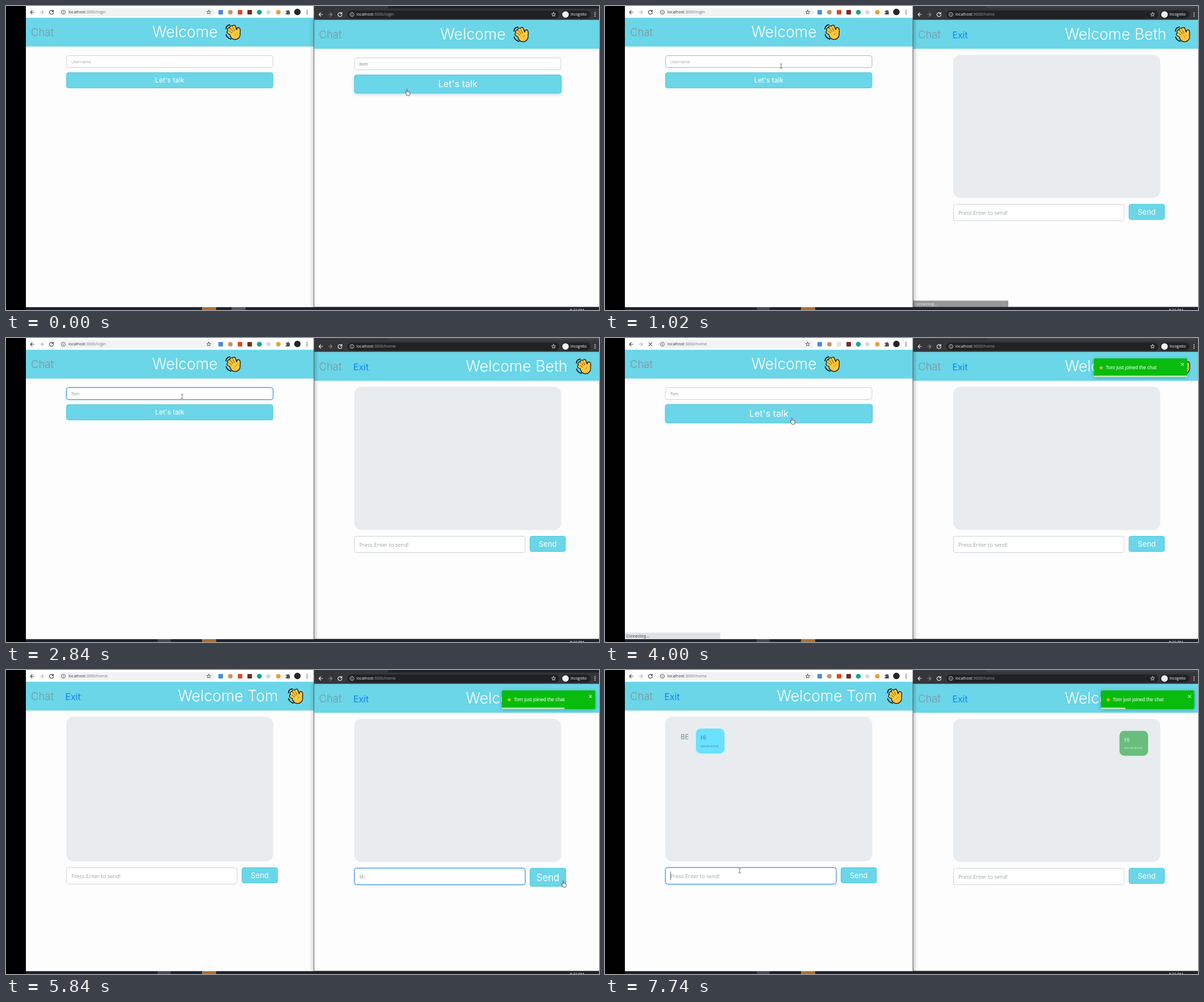
An HTML page for the animation above (8 s loop, 1044 by 536 pixels).

```html
<!DOCTYPE html>
<html lang="en">
<head>
<meta charset="utf-8">
<title>Chat demo</title>
<style>
html, body { margin: 0; width: 100%; height: 100%; overflow: hidden; background: #000; }
svg { display: block; width: 1044px; height: 536px; }
text { white-space: pre; }
.brand { font-family: Inter, Roboto, sans-serif; font-weight: 300; }
.label { font-family: Inter, Roboto, sans-serif; font-weight: 400; }
.ui { font-family: "Open Sans", "Noto Sans", sans-serif; }
.field { font-family: "Open Sans", "Noto Sans", sans-serif; font-weight: 300; }
.toast { font-family: "Liberation Sans", Arial, sans-serif; }
.glyph { font-family: "DejaVu Sans", sans-serif; }
.line { fill: none; stroke-linecap: round; stroke-linejoin: round; }
.lift { filter: drop-shadow(0 2px 2.5px rgba(50, 125, 220, .32)); }
.glow { filter: drop-shadow(0 0 1.5px rgba(40, 130, 240, .5)); }
.raised { filter: drop-shadow(0 1px 3px rgba(0, 0, 0, .25)); }
</style>
</head>
<body>
<svg id="stage" viewBox="0 0 1044 536"></svg>
<script>
const LOOP = 8000;
const CYAN = '#6ad6e8', RIM = '#52c8dc', PANEL = '#e8ecef', BLUE = '#2f8df5', GREY = '#ccd2d8';
const stage = document.getElementById('stage');

const rect = (x, y, w, h, fill, r = 0, extra = '') =>
  `<rect x="${x}" y="${y}" width="${w}" height="${h}" rx="${r}" fill="${fill}" ${extra}/>`;
const circle = (x, y, r, fill, extra = '') => `<circle cx="${x}" cy="${y}" r="${r}" fill="${fill}" ${extra}/>`;
const text = (cls, x, y, size, fill, str, anchor = 'start') =>
  `<text class="${cls}" x="${x}" y="${y}" font-size="${size}" fill="${fill}" text-anchor="${anchor}">${str}</text>`;
const line = (d, color, width = 1.2) => `<path class="line" d="${d}" stroke="${color}" stroke-width="${width}"/>`;
const move = (x, y, content) => `<g transform="translate(${x} ${y})">${content}</g>`;
const during = (from, to, content) => `<g data-from="${from}" data-to="${to}">${content}</g>`;

// Waving hand, 28 by 28
function wave(x, y) {
  const fingers = 'M16 20L6 14.5M16 18L7 9.8M17 17L10.8 6.3M19 16L15.2 5.2M21.5 19Q24.500 15 23.200 9.500';
  return move(x, y,
    line('M1.3 9Q1.5 2.5 8 1.6M1.5 19Q3.5 25.5 10 26.8', '#080808', 1.7) +
    line(fingers, '#080808', 7) + circle(17.3, 18.6, 9.6, '#080808') +
    line(fingers, '#ffc83d', 4.6) + circle(17.3, 18.6, 8.4, '#ffc83d') +
    line('M7.300 12.600L12 16M9.500 8.500L13.800 13.600M13.500 6.500L16.500 12.500', '#3a2c10', .8) +
    line('M17 20Q17.500 16.500 21 15.500', '#d88a1c', 1));
}

function button(x, y, w, h, size, label, cls = '') {
  return rect(x, y, w, h, CYAN, 3.5, `stroke="${RIM}" class="${cls}"`) +
    text('label', x + w / 2, y + h / 2 + size * .36, size, '#fff', label, 'middle');
}

const input = (x, y, w, h, stroke = GREY, cls = '') =>
  rect(x, y, w, h, '#fff', 4, `stroke="${stroke}" class="${cls}"`);

const talk = (hover, cls) => hover
  ? button(71.5, 97.5, 364, 32, 16.2, "Let's talk", cls)
  : button(71.5, 97.5, 363.5, 27, 12.1, "Let's talk");

const loginField = (value, stroke, cls) =>
  input(71.5, 67.5, 363.5, 21, stroke, cls) +
  text('field', 80, 81, 7.4, value ? '#40484f' : '#6c757d', value || 'Username');

const header = (name) => rect(0, .5, 510, 51, CYAN) +
  text('brand', 9, 32.7, 18.5, '#7f949b', 'Chat') +
  (name ? text('label', 69.5, 32.5, 15.8, '#0b82f5', 'Exit') : '') +
  text('brand', name ? 267.5 : 222.5, 35, 26.6, '#fff', name ? 'Welcome ' + name : 'Welcome') +
  wave(name ? 461 : 351, 11.5);

const sendField = (value, y, stroke, cls) =>
  input(71.5, y, 300.5, 29, stroke, cls) +
  text('field', 80, y + 18.6, 9.7, value ? '#40484f' : '#6c757d', value || 'Press Enter to send!');

const send = (y, hover) => hover
  ? button(380.5, y, 63, 32, 16.8, 'Send')
  : button(380.5, y, 62.5, 27, 13, 'Send');

const bubble = (x, y, fill, ink) => rect(x, y, 50.5, 44, fill, 8.5) +
  text('brand', x + 8.3, y + 19.5, 10, ink, 'Hi') +
  text('label', x + 8.3, y + 32.2, 3.8, ink, '2021-05-23 17:23');

const status = (fill, ink) => rect(0, 499.5, 168, 12, fill, 1) + text('ui', 2.5, 508.3, 6.6, ink, 'Connecting...');

const reload = (x, y, color) =>
  line(`M${x + 2.6} ${y - 2.2}A3.5 3.5 0 1 0 ${x + 3.4} ${y + .9}M${x + 3.3} ${y - 3.6}V${y - 1.1}H${x + .8}`, color);

const arrows = (x, y, on, off) =>
  line(`M${x + 3.3} ${y}H${x - 3}M${x} ${y - 3}L${x - 3} ${y}L${x} ${y + 3}`, on) +
  line(`M${x + 13.8} ${y}H${x + 20}M${x + 17} ${y - 3}L${x + 20} ${y}L${x + 17} ${y + 3}`, off);

const info = (x, y, color) => circle(x, y, 3.5, 'none', `stroke="${color}"`) +
  line(`M${x} ${y}V${y + 1.6}M${x} ${y - 1.7}V${y - 1.6}`, color, 1);

const dots = (x, y, color) => [-3, 0, 3].map(d => circle(x, y + d, .9, color)).join('');

function star(x, y, color) {
  const points = Array.from({ length: 10 }, (_, i) => {
    const angle = Math.PI * (i / 5 - .5), r = i % 2 ? 1.7 : 3.8;
    return `${(x + r * Math.cos(angle)).toFixed(2)} ${(y + r * Math.sin(angle)).toFixed(2)}`;
  });
  return line(`M${points.join('L')}Z`, color, .9);
}

function address(x, y, ink, dim, from) {
  const url = tail => text('ui', x, y, 7.05, ink, `localhost<tspan fill="${dim}">:3000/${tail}</tspan>`);
  return during(0, from, url('login')) + during(from, LOOP, url('home'));
}

function leftBrowser() {
  const badges = rect(374, 7, 8, 8, '#4b8fd4', 1) + circle(395, 11, 4, '#b99b66') +
    during(0, 3870, rect(408, 7, 8, 8, '#d9482b', 1)) +
    during(3870, 4140, rect(408, 7, 8, 8, '#e4e4e4', 1)) +
    during(4140, LOOP, rect(408, 7, 8, 8, '#d9482b', 1)) +
    rect(425, 7, 8, 8, '#7c2a20', 1) + circle(446, 11, 4.3, '#18a58a') +
    circle(462, 11, 3.7, '#d5d8dc') + circle(479.5, 11, 4, '#e6a03c') +
    '<path d="M492.5 8.5H495a1.5 1.5 0 0 1 3 0H499.5V11a1.5 1.5 0 0 1 0 2.5V15H492.5V13a1.5 1.5 0 0 0 0-3Z" fill="#505458"/>' +
    circle(513, 10.5, 5.7, '#22262b');
  return rect(35, 0, 507, 20.5, '#fff') + arrows(46, 11, '#45494d', '#b5b8bb') +
    during(0, 3600, reload(80, 11, '#45494d')) +
    during(3600, 4210, line('M77.3 8.3L82.7 13.7M82.7 8.3L77.3 13.7', '#45494d')) +
    during(4210, LOOP, reload(80, 11, '#45494d')) +
    rect(93, 3.5, 275, 14.5, '#f1f3f4', 7.2) + info(101, 11, '#5f6368') +
    address(110, 13.4, '#303438', '#737a80', 3600) +
    star(357, 11, '#4a4e52') + badges + dots(530, 11, '#4a4e52');
}

function rightBrowser() {
  const frame = fill => rect(673, 0, 371, 4.5, fill);
  return rect(542, 0, 502, 24.5, '#35363a') + frame('#202124') +
    during(750, 4770, frame('#3c4043')) + during(7600, LOOP, frame('#3c4043')) +
    arrows(554, 15, '#e8eaed', '#85888c') + reload(588, 15, '#e8eaed') +
    rect(601, 8, 373, 14, '#202124', 7) + info(609, 15, '#c5c8cc') +
    address(617, 17.4, '#f1f3f4', '#9aa0a6', 280) +
    star(964, 15, '#d5d8dc') +
    rect(977, 8, 52, 14, '#202124', 7) + circle(985, 15, 5.8, '#f1f3f4') +
    text('ui', 994, 17.4, 6.5, '#fff', 'Incognito') + dots(1037, 15, '#e8eaed');
}

function leftPage() {
  const typed = [[1780, 1850, 'T'], [1850, 2310, 'To'], [2310, 3600, 'Tom']];
  const login = header() +
    during(0, 820, loginField('')) +
    during(820, 1450, loginField('', '#a9b5bf')) +
    during(1450, 1780, loginField('', BLUE, 'glow')) +
    typed.map(([from, to, value]) => during(from, to, loginField(value, BLUE, 'glow'))).join('') +
    during(3600, 4140, loginField('Tom')) +
    during(0, 3050, talk(false)) + during(3050, 3600, talk(true, 'lift')) +
    during(3600, 4140, talk(true, 'glow'));
  const home = header('Tom') + rect(71, 62.5, 364.5, 255, PANEL, 13) +
    during(6370, LOOP,
      circle(105.5, 97.5, 12.5, '#eaedef', 'stroke="#e1e6e9" stroke-width=".7"') +
      text('brand', 105.5, 101.7, 11.5, '#456b70', 'BE', 'middle') +
      bubble(125, 83.3, '#69e1ff', '#32636e')) +
    during(0, 7600, sendField('', 328.5)) +
    during(7600, LOOP, sendField('', 328.5, BLUE, 'glow') + line('M80.5 336V350', '#444', .8)) +
    send(328.5);
  return move(35, 20, rect(0, 0, 507, 511, '#fdfdfd') +
    during(0, 4140, login) + during(4140, LOOP, home) + during(3600, 4560, status('#dee1e6', '#33383d')));
}

function rightPage() {
  const login = move(0, 4, header() + loginField('Beth') + talk(true, 'lift'));
  const home = move(0, 4, header('Beth')) + rect(71, 66, 364.5, 252.5, PANEL, 13) +
    during(6160, LOOP, bubble(363.7, 87.2, '#69be7e', '#fff')) +
    during(0, 5470, sendField('', 329.5)) +
    during(5470, 5550, sendField('', 329.5, BLUE, 'glow')) +
    during(5550, 5620, sendField('H', 329.5, BLUE, 'glow')) +
    during(5620, 6160, sendField('Hi', 329.5, BLUE, 'glow')) +
    during(6160, LOOP, sendField('', 329.5)) +
    during(0, 5770, send(329.5)) + during(5770, 6440, send(329.5, true)) + during(6440, LOOP, send(329.5));
  return move(542, 20, rect(0, 4, 502, 507, '#fdfdfd') +
    during(0, 280, login) + during(280, LOOP, home) + during(280, 1300, status('#979797', '#f1f1f1')) +
    rect(0, 510.4, 502, 1, '#55585c'));
}

const toast = () => during(3870, LOOP, '<g id="toast">' +
  rect(873, 36, 164.5, 33, '#07bc0c', 2, 'class="raised"') +
  '<rect id="progress" x="873" y="66.3" height="2.7" fill="#fff" fill-opacity=".7"/>' +
  text('glyph', 886, 55.6, 10.5, '#ffb92e', '★', 'middle') +
  text('toast', 894, 54.8, 8.5, '#fff', 'Tom just joined the chat') +
  line('M1026.8 44.3L1031.2 48.7M1031.2 44.3L1026.8 48.7', '#d9f5da', 1.1) + '</g>');

const taskbar = () => rect(35, 531, 1009, 5, '#1a2530') + rect(345, 531, 25, 5, '#b0702c') +
  during(0, 750, rect(397, 531, 25, 5, '#515c66')) +
  during(750, LOOP, rect(267, 531, 23, 5, '#3f4b56')) +
  text('ui', 993, 539.3, 6.6, '#fff', '5:33 PM');

const shade = (x, id) => rect(x, 24.5, 8, 506.5, `url(#${id})`);
const pointers = {
  hand: '<path d="M-2.5 3L-4 .8Q-3.6-.6-2 .6V-4.5Q-1.2-6-.3-4.5V-1Q.6-1.7 1.3-.7Q2.3-1.2 2.8-.2Q4-.5 4.2.8V3.3Q4 4.5 3.2 6H-1.2Z" fill="#fff" stroke="#333" stroke-width=".8"/>',
  arrow: '<path d="M-2-4.5V4.3L0 2.5L1.4 5.4L2.7 4.8L1.4 2H4Z" fill="#fff" stroke="#222" stroke-width=".8"/>',
  beam: line('M-1.8-4Q0-4 0-3Q0-4 1.8-4M0-3V3M-1.8 4Q0 4 0 3Q0 4 1.8 4', '#555', .8)
};

stage.innerHTML =
  `<defs><linearGradient id="fadeOut"><stop stop-opacity=".2"/><stop offset="1" stop-opacity="0"/></linearGradient>
   <linearGradient id="fadeIn"><stop stop-opacity="0"/><stop offset="1" stop-opacity=".12"/></linearGradient></defs>` +
  leftPage() + leftBrowser() + rightPage() + rightBrowser() +
  during(0, 750, shade(534, 'fadeIn')) + during(750, 4770, shade(542, 'fadeOut')) +
  during(4770, 7600, shade(534, 'fadeIn')) + during(7600, LOOP, shade(542, 'fadeOut')) +
  rect(541.6, 0, 1, 531, '#55585c') + toast() + taskbar() + rect(0, 0, 35, 536, '#000') +
  Object.entries(pointers).map(([kind, art]) => `<g id="${kind}">${art}</g>`).join('');

// time, x, y, pointer shown from then on
const path = [
  [0, 707, 152, 'hand'], [280, 707, 152, 'arrow'], [820, 322, 109, 'beam'], [1020, 310, 106, 'beam'],
  [1300, 310, 103, 'beam'], [2840, 310, 103, 'beam'], [3050, 316, 117, 'hand'], [3400, 330, 146, 'hand'],
  [4140, 330, 146, 'arrow'], [4350, 421, 219, 'arrow'], [4630, 545, 290, 'arrow'], [5400, 760, 365, 'beam'],
  [5620, 780, 366, 'arrow'], [5770, 960, 375, 'hand'], [5840, 982, 377, 'hand'], [6370, 982, 377, 'arrow'],
  [7120, 400, 372, 'beam'], [7600, 237, 354, 'beam'], [LOOP, 237, 354, 'beam']
];
const bounce = [[0, 1530], [.6, -13], [.75, 5], [.9, -2.5], [1, 0]];
const clamp = v => Math.min(1, Math.max(0, v));
const timed = [...stage.querySelectorAll('[data-from]')].map(el => ({ el, from: +el.dataset.from, to: +el.dataset.to }));
const get = id => document.getElementById(id);

function segment(keys, t) {
  const i = Math.max(1, keys.findIndex(key => key[0] > t));
  const a = keys[i - 1], b = keys[i];
  return [a, b, clamp((t - a[0]) / (b[0] - a[0]))];
}

function toastShift(p) {
  if (p >= 1) return 0;
  const [a, b, k] = segment(bounce, p);
  return a[1] + (b[1] - a[1]) * (1 - (1 - k) ** 3);
}

function render(t) {
  for (const { el, from, to } of timed) el.style.display = t >= from && t < to ? '' : 'none';
  const [a, b, k] = segment(path, t);
  for (const kind in pointers) {
    const el = get(kind);
    el.style.display = kind === a[3] ? '' : 'none';
    el.setAttribute('transform', `translate(${a[1] + (b[1] - a[1]) * k} ${a[2] + (b[2] - a[2]) * k})`);
  }
  get('toast').setAttribute('transform', `translate(${toastShift((t - 3580) / 700)} 0)`);
  get('progress').setAttribute('width', 164.5 * clamp(1 - (t - 4300) / 4670));
}

const start = performance.now();
function tick() {
  render((performance.now() - start) % LOOP);
  requestAnimationFrame(tick);
}
tick();
</script>
</body>
</html>
```
